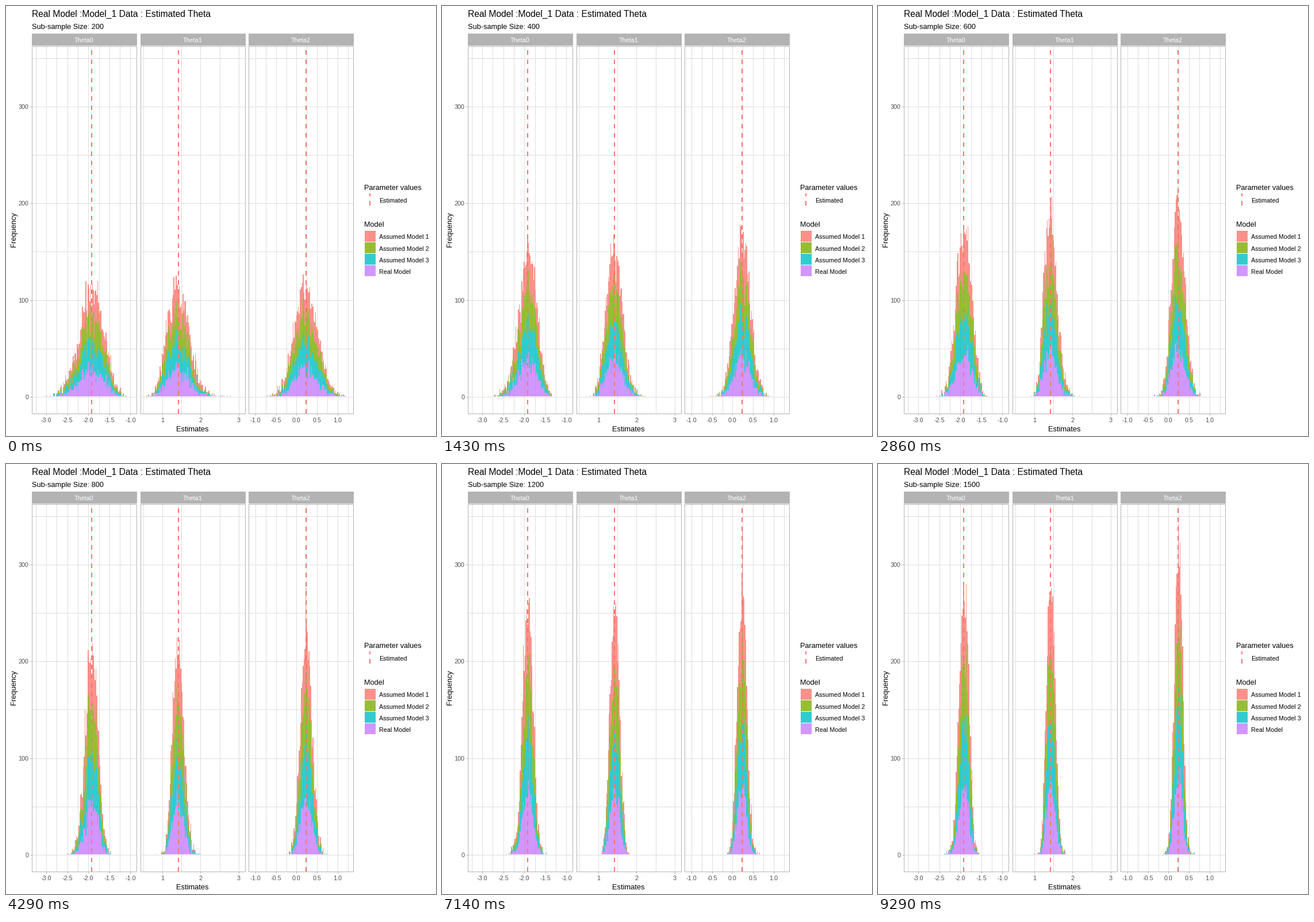
A matplotlib script for the animation above (10 s loop, 748 px wide and 748 px high).

```python
import numpy as np
import matplotlib.pyplot as plt
from matplotlib.animation import FuncAnimation
from matplotlib.patches import Rectangle

plt.rcParams["font.family"] = "Liberation Sans"

SIZE, DPI = 748, 68
PT = 72 / DPI  # points per pixel
LOOP, STEP = 10000, 50
TOP, BOTTOM, ZERO, PER_COUNT = 69, 709, 679.4, 1.6835
GRID, GREY, TICK_TEXT, RED = "#DEDEDE", "#B3B3B3", "#4D4D4D", "#F8766D"
FILLS = [RED, "#7CAE00", "#00BFC4", "#C77CFF"]
MODELS = ["Assumed Model 1", "Assumed Model 2", "Assumed Model 3", "Real Model"]
SIZES = range(200, 1600, 100)
REPS, BIN = 1000, 0.02

# left/right: panel edges, ref: reference value and its pixel, scale: px per unit
PANELS = [
    dict(name="Theta0", left=45, right=227, ref=-2.0, px=143.2, scale=73.25,
         ticks=[-3, -2.5, -2, -1.5, -1], step=0.25, lo=-3.25, fmt="%.1f",
         line=149.5, mean=-1.914, bias=-0.025, sd=0.295, power=0.475, skew=-0.04),
    dict(name="Theta1", left=234, right=416, ref=1, px=272, scale=66.5,
         ticks=[1, 2, 3], step=0.5, lo=0.5, fmt="%d",
         line=300.5, mean=1.425, bias=0.015, sd=0.293, power=0.5, skew=0.06),
    dict(name="Theta2", left=422, right=604, ref=0, px=505.5, scale=71.5,
         ticks=[-1, -0.5, 0, 0.5, 1], step=0.25, lo=-1.0, fmt="%.1f",
         line=522, mean=0.235, bias=0.0, sd=0.285, power=0.525, skew=0.0),
]

fig = plt.figure(figsize=(SIZE / DPI, SIZE / DPI), dpi=DPI, facecolor="white")
ax = fig.add_axes([0, 0, 1, 1])
ax.axis("off")


def label(x, y, text, size, color="black", **kw):
    return ax.text(x, y, text, fontsize=size * PT, color=color, zorder=6, **kw)


def line(xs, ys, color, width=1.0, z=1, **kw):
    ax.plot(xs, ys, color=color, lw=width * PT, zorder=z,
            solid_capstyle="butt", dash_capstyle="butt", **kw)


def box(x, y, w, h, color, **kw):
    ax.add_patch(Rectangle((x, y), w, h, fc=color, ec="none", **kw))


def to_px(panel, value):
    return panel["px"] + (value - panel["ref"]) * panel["scale"]


def count_y(count):
    return ZERO + 0.5 - count * PER_COUNT


def dashed(x, y0, y1):
    line([x, x], [y0, y1], RED, 2, 4, ls=(0, (4, 4)))


def draw_panel(p):
    left, right = p["left"], p["right"]
    for count in range(0, 400, 50):
        y = count_y(count)
        if y > TOP:
            line([left, right], [y, y], GRID)
    x = to_px(p, p["lo"])
    while x < right:
        line([x, x], [TOP, BOTTOM], GRID)
        x += p["step"] * p["scale"]
    for t in p["ticks"]:
        x = to_px(p, t)
        line([x, x], [BOTTOM, BOTTOM + 3], GREY)
        label(x, 724, p["fmt"] % t, 10.7, TICK_TEXT, ha="center")
    dashed(p["line"], BOTTOM, TOP)
    line([left + .5, right + .5, right + .5, left + .5, left + .5],
         [TOP + .5, TOP + .5, BOTTOM - .5, BOTTOM - .5, TOP + .5], GREY, z=5)
    box(left, 48, right + 1 - left, TOP - 48, GREY, zorder=5)
    label((left + right) / 2, 63, p["name"], 10.7, "white", ha="center")


def draw_legend():
    label(623.5, 319.5, "Parameter values", 12.7)
    dashed(633, 347, 326)
    label(649, 341.5, "Estimated", 10.7)
    label(623.5, 384, "Model", 12.7)
    for i, (name, fill) in enumerate(zip(MODELS, FILLS)):
        y = 391 + round(20.16 * i)
        box(624, y, 19, 19, fill, alpha=0.8)
        label(649, 405.4 + 20.2 * i, name, 10.75)


def stack_counts(p, n, rng):
    """Cumulative bin counts, from the bottom layer up."""
    ratio = n / 200
    sd = p["sd"] * ratio ** -p["power"]
    skew = p["skew"] / np.sqrt(ratio)
    mean = p["mean"] + p["bias"] / ratio
    shared = rng.standard_normal(REPS)
    layers = []
    for _ in MODELS:
        z = 0.9 * shared + 0.436 * rng.standard_normal(REPS)
        values = mean + sd * (z + skew * (z * z - 1))
        layers.append(np.histogram(values, p["edges"])[0])
    return np.cumsum(layers, axis=0)


rng = np.random.default_rng(12)
for p in PANELS:
    draw_panel(p)
    first = (p["left"] + 4 - p["px"]) / p["scale"] + p["ref"]
    last = (p["right"] - 4 - p["px"]) / p["scale"] + p["ref"]
    p["edges"] = np.arange(np.ceil(first / BIN), np.floor(last / BIN)) * BIN + BIN / 2
    p["edges_px"] = np.round(to_px(p, p["edges"]))
    p["floor"] = np.full(len(p["edges"]) - 1, np.round(ZERO))
    p["tops"] = [np.round(ZERO - stack_counts(p, n, rng) * PER_COUNT) for n in SIZES]
    p["layers"] = [
        ax.stairs(p["floor"], p["edges_px"], baseline=p["floor"], fill=True,
                  color=fill, alpha=0.8, lw=0, antialiased=False, zorder=3)
        for fill in reversed(FILLS)
    ]

for count in range(0, 400, 100):
    y = count_y(count)
    line([42, 45], [y, y], GREY)
    label(39.5, y + 4, str(count), 10.7, TICK_TEXT, ha="right")

label(45, 19, "Real Model :Model_1 Data : Estimated Theta", 15.6)
subtitle = label(45, 40, "", 12.8)
label(324.5, 740.5, "Estimates", 12.9, ha="center")
label(17.5, 388.5, "Frequency", 12.9, rotation=90, rotation_mode="anchor", ha="center")
draw_legend()
ax.set_xlim(0, SIZE)
ax.set_ylim(SIZE, 0)


def update(frame):
    # a size shows from the step in which its share of the loop begins
    k = int((frame * STEP + STEP - 1) * len(SIZES) / LOOP) % len(SIZES)
    if frame == LOOP // STEP - 1:
        k = len(SIZES) - 1
    subtitle.set_text(f"Sub-sample Size: {SIZES[k]}")
    for p in PANELS:
        base = p["floor"]
        for layer, top in zip(p["layers"], p["tops"][k]):
            layer.set_data(top, p["edges_px"], base)
            base = top
    return []


anim = FuncAnimation(fig, update, frames=LOOP // STEP, interval=STEP,
                     repeat=True, repeat_delay=0, init_func=lambda: update(0))
plt.show()
```
